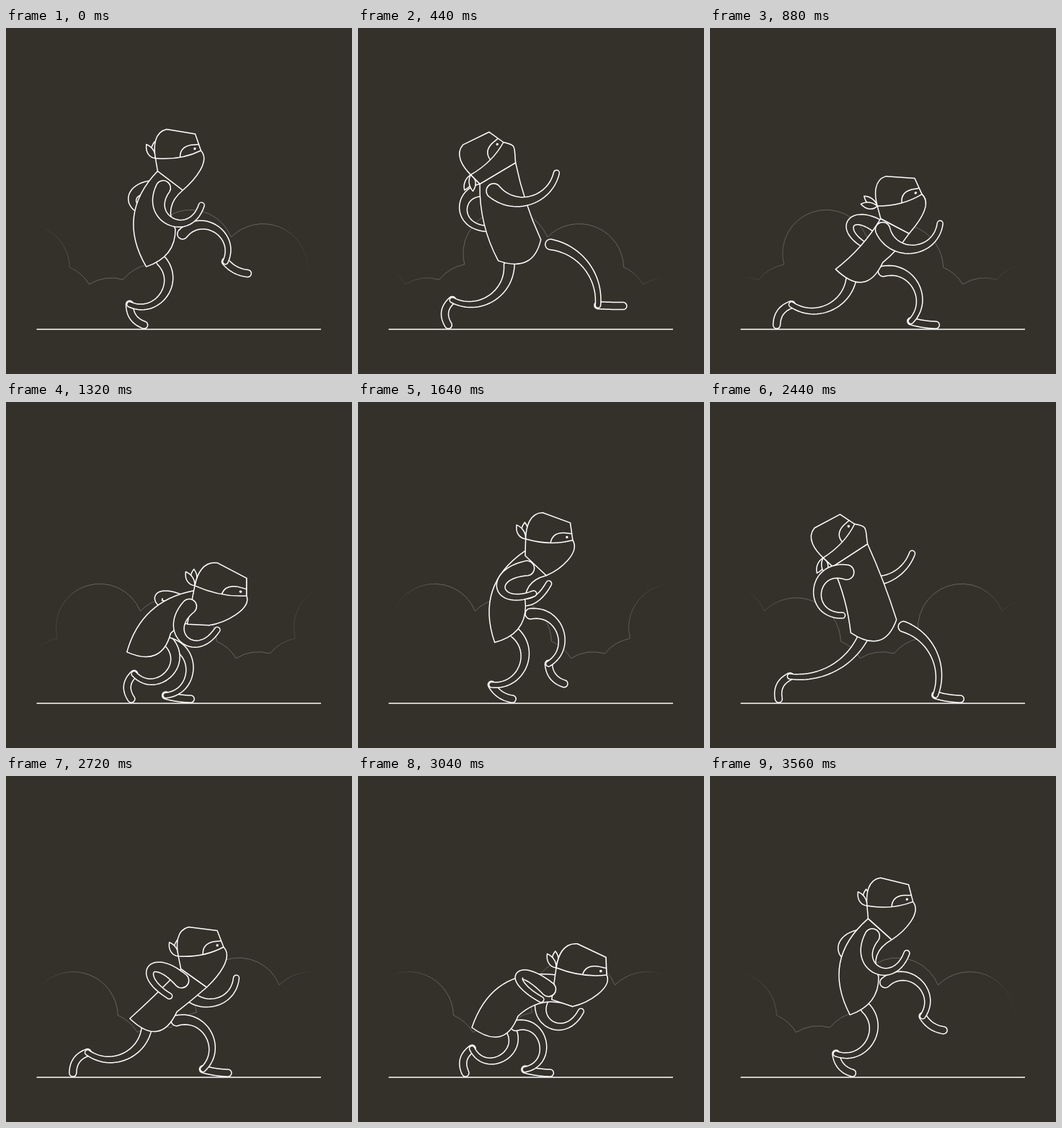
An HTML page with a canvas that plays this animation: 480 px wide and 480 px high, repeating every 3600 ms.

```html
<!DOCTYPE html>
<html lang="en">
<head>
<meta charset="utf-8">
<title>Sneaking ninja</title>
<style>
  html, body { margin: 0; width: 100%; height: 100%; overflow: hidden; background: #34312b; }
  canvas { display: block; width: 480px; height: 480px; }
</style>
</head>
<body>
<canvas id="stage" width="480" height="480"></canvas>
<script>
const ctx = document.getElementById('stage').getContext('2d');
const BG = '#34312b', LINE = '#fff';
const LOOP = 3.6, STEP = 1.8, CLOUD_SPAN = 330;
const RAD = Math.PI / 180;

// Key poses of one step: seconds, pelvis x, y, angle, head knot x, y, tilt
const POSES = [
  [0.16, 217,306,-43, 156,190,-36],
  [0.64, 227,311,-16, 157,216,-47],
  [0.88, 207,330, -8, 232,247,-15],
  [1.24, 190,341,-14, 275,266,  8],
  [1.32, 198,334,-23, 262,255, 11],
  [1.76, 214,305,-53, 218,180, -5],
];
// Hand relative to shoulder: seconds, x, y
const SWING = [
  [0, 53,24], [0.16, 73,-20], [0.64, 91,-26], [1.28, 42,32],
  [1.96, -7,38], [2.44, -6,60], [2.75, -17,20], [3.12, -7,14],
];
// Foot pitch: seconds, degrees from flat
const PITCH = [[0.16, 72], [0.88, 126], [1.8, 28], [1.96, -11], [2.44, 9], [3.1, 8]];

const clamp = x => Math.min(1, Math.max(0, x));
const ease = x => { const u = clamp(x); return u * u * (3 - 2 * u); };
const mix = (a, b, u) => a + (b - a) * u;
const blend = (p, q, u) => [mix(p[0], q[0], u), mix(p[1], q[1], u)];
const heading = (p, q) => Math.atan2(q[1] - p[1], q[0] - p[0]);
const dist = (p, q) => Math.hypot(q[0] - p[0], q[1] - p[1]);

// Point reached from p by going along a heading and then to its right.
function move([x, y], angle, along, side = 0) {
  const c = Math.cos(angle), s = Math.sin(angle);
  return [x + along * c - side * s, y + along * s + side * c];
}

// Periodic monotone cubic through the keys.
function sample(keys, time, period) {
  const n = keys.length, first = keys[0][0];
  const t = first + ((time - first) % period + period) % period;
  const key = i => keys[(i + n) % n];
  const at = i => key(i)[0] + Math.floor(i / n) * period;
  let i = n - 1;
  while (at(i) > t) i--;
  const h = at(i + 1) - at(i), u = (t - at(i)) / h, w = 1 - u;
  return key(i).slice(1).map((a, k) => {
    const v = j => key(j)[k + 1];
    const slope = j => (v(j + 1) - v(j)) / (at(j + 1) - at(j));
    const tangent = j => {
      const p = slope(j - 1), q = slope(j);
      return p * q > 0 ? 2 * p * q / (p + q) : 0;
    };
    return mix(a, v(i + 1), ease(u)) + h * u * w * (tangent(i) * w - tangent(i + 1) * u);
  });
}

function paint(path) {
  ctx.fillStyle = BG;
  ctx.fill(path);
  ctx.stroke(path);
}

// Round-ended tube along a cubic.
function tube(a, b, c, d, radius) {
  const N = 28, left = [], right = [], q = Math.PI / 2;
  const at = t => {
    const ab = blend(a, b, t), bc = blend(b, c, t), cd = blend(c, d, t);
    const p = blend(ab, bc, t), r = blend(bc, cd, t);
    return { pos: blend(p, r, t), dir: heading(p, r) };
  };
  for (let i = 0; i <= N; i++) {
    const t = i / N, { pos, dir } = at(t);
    left.push(move(pos, dir, 0, -radius(t)));
    right.unshift(move(pos, dir, 0, radius(t)));
  }
  const path = new Path2D(), d0 = at(0).dir, d1 = at(1).dir;
  left.forEach(p => path.lineTo(...p));
  path.arc(...d, radius(1), d1 - q, d1 + q);
  right.forEach(p => path.lineTo(...p));
  path.arc(...a, radius(0), d0 + q, d0 + 3 * q);
  path.closePath();
  paint(path);
}

// Rubber limb of a given length, bowed to one side like an arc.
function hose(a, b, length, side, radius) {
  const d = dist(a, b), angle = heading(a, b);
  const bow = 0.42 * Math.sqrt(Math.max(0, length * length - d * d));
  const along = Math.max((d - 4 * bow * bow / d) / 3, -0.15 * bow);
  const out = side * bow * 4 / 3;
  tube(a, move(a, angle, along, out), move(b, angle, -along, out), b, radius);
}

// The ground slows and quickens once per step.
const drift = t => 7.5 * (Math.cos(2 * Math.PI * (t + 0.1) / STEP) - 1);

function toeAt(t) {
  const planted = s => 192 - 140 * s + drift(s) / 2;
  const OFF = 0.66, LAND = 2.4, REACH = 380;
  const lift = t > 1.5 && t < LAND ? Math.sin(Math.PI * (t - 1.5) / 0.9) ** 2 : 0;
  let x;
  if (t < OFF) x = planted(t);
  else if (t > LAND) x = planted(t - LOOP);
  else if (t < 2.1) x = mix(planted(OFF), REACH, ease((t - 0.9) / 1.2));
  else x = mix(REACH, planted(LAND - LOOP), ease((t - 2.1) / 0.3));
  return [x, 412 - 95 * lift];
}

function makeBody(time) {
  const [px, py, turn, kx, ky, tilt] = sample(POSES, time, STEP);
  const pelvis = [px, py], knot = [kx, ky], a = tilt * RAD, hip = turn * RAD;
  const stoop = Math.max(0, tilt), lean = clamp((-tilt - 12) / 28);
  const back = move(knot, a, 0, 18 - stoop);
  const nape = move(knot, a, 0, 18 + 3.3 * stoop);
  const chin = move(knot, a, 30 + 26 * lean, 50 - 18 * lean);
  const shoulder = [0, 1].map(i =>
    back[i] + 0.2 * (chin[i] - back[i]) + 0.17 * (pelvis[i] - back[i]));
  return { pelvis, knot, tilt, a, hip, turn, stoop, lean, back, nape, chin, shoulder,
    rump: move(pelvis, hip, -33), belly: move(pelvis, hip, 33) };
}

function drawLeg(body, time) {
  const t = time % LOOP;
  const slide = 10 - 32 * Math.cos(2 * Math.PI * (t - 0.42) / LOOP) + 1.5 * body.stoop;
  const hip = move(body.pelvis, body.hip, slide, 12);
  const pitch = sample(PITCH, t, LOOP)[0] * RAD, toe = toeAt(t);
  const ankle = move(toe, pitch + Math.PI, 35);
  const arch = move(blend(toe, ankle, 0.5), pitch, 0, 15 * Math.max(0, Math.sin(pitch)));
  tube(ankle, blend(ankle, arch, 0.67), blend(toe, arch, 0.67), toe, () => 5);
  hose(hip, ankle, 70 + 0.45 * dist(hip, ankle), -1, u => 3.7 + 3.6 * (1 - u) ** 1.5);
}

function drawArm(body, time) {
  const [x, y] = sample(SWING, time, LOOP), [sx, sy] = body.shoulder;
  hose(body.shoulder, [sx + x, sy + y], 103 + 0.08 * Math.hypot(x, y), 1,
    u => 4 + 6.3 * (1 - u) ** 2);
}

function drawTorso({ back, rump, belly, chin, pelvis, hip, turn }) {
  const hunch = 1.5 * (dist(back, rump) - 100);
  const bend = (p, q, side) => move(blend(p, q, 0.5), heading(p, q), 0, side);
  const path = new Path2D();
  path.moveTo(...back);
  path.quadraticCurveTo(...bend(back, rump, hunch), ...rump);
  path.quadraticCurveTo(...move(pelvis, hip, 3, 50 - Math.abs(turn) / 2), ...belly);
  path.quadraticCurveTo(...bend(belly, chin, -0.45 * hunch), ...chin);
  path.closePath();
  paint(path);
}

const HOOD = new Path2D('M0 0C0-16 4-36 22-37L60-24 64 0Q34 9 0 0Z');
const SLIT = new Path2D('M34 4.3Q36-10 52-10L62.5-9');
const LEAF = new Path2D('M0 0C6-7 15-7 23 0C16 5 7 5 0 0Z');

function drawHead({ knot, tilt, a, stoop, lean, nape, chin }) {
  for (const spread of [-15, 15]) {
    ctx.save();
    ctx.translate(...knot);
    ctx.rotate(-(108 + 155 * Math.sqrt(lean) + spread) * RAD);
    paint(LEAF);
    ctx.restore();
  }

  const size = 1 + 0.013 * stoop, brow = move(knot, a, 64 * size);
  const mask = new Path2D();
  mask.moveTo(...knot);
  mask.lineTo(...nape);
  mask.lineTo(...chin);
  mask.bezierCurveTo(...move(chin, (tilt * 1.6 - 25) * RAD, 22),
    ...move(brow, (tilt + 57) * RAD, 20), ...brow);
  mask.closePath();
  paint(mask);

  ctx.save();
  ctx.translate(...knot);
  ctx.rotate(a);
  ctx.scale(size, 1);
  paint(HOOD);
  ctx.stroke(SLIT);
  ctx.fillStyle = LINE;
  ctx.beginPath();
  ctx.arc(56, -4, 1.7, 0, 7);
  ctx.fill();
  ctx.restore();
}

const CLOUD = new Path2D('M-17 290A62 62 0 0 1 89 332A60 60 0 0 1 116 355.5' +
  'A60 60 0 0 1 163 349A60 60 0 0 1 198 328A60.7 60.7 0 0 1 313 290');
const haze = ctx.createLinearGradient(45, 0, 425, 0);
[[0, 0], [0.18, 0.24], [0.84, 0.24], [1, 0]].forEach(([at, alpha]) =>
  haze.addColorStop(at, `rgba(255,255,255,${alpha})`));

function drawClouds(time) {
  const x = drift(time) - CLOUD_SPAN * time / LOOP;
  const sky = new Path2D();
  for (let i = 0; i < 3; i++)
    sky.addPath(CLOUD, new DOMMatrix([1, 0, 0, 1, x + i * CLOUD_SPAN, 0]));
  ctx.strokeStyle = haze;
  ctx.lineWidth = 1;
  ctx.stroke(sky);
}

function draw(time) {
  ctx.fillStyle = BG;
  ctx.fillRect(0, 0, 480, 480);
  drawClouds(time);
  ctx.strokeStyle = LINE;
  ctx.lineWidth = 1.5;
  ctx.lineJoin = 'round';
  const body = makeBody(time);
  drawArm(body, time + STEP);
  drawLeg(body, time + STEP);
  drawLeg(body, time);
  drawTorso(body);
  drawHead(body);
  drawArm(body, time);
  ctx.beginPath();
  ctx.moveTo(42.5, 418);
  ctx.lineTo(437, 418);
  ctx.stroke();
}

const start = performance.now();
function frame() {
  draw((performance.now() - start) / 1000 % LOOP);
  requestAnimationFrame(frame);
}
frame();
</script>
</body>
</html>
```
